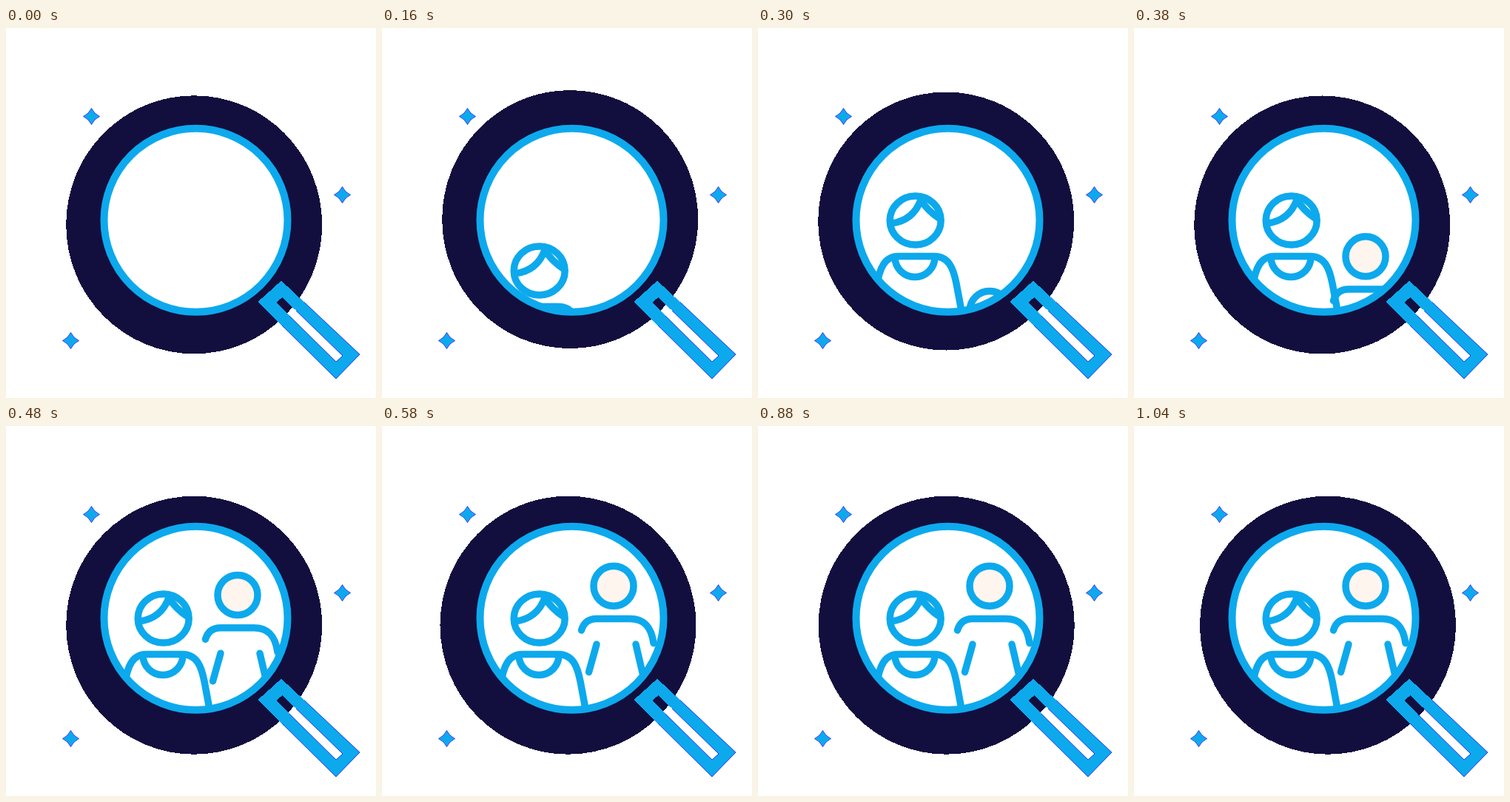
Recreate the animation shown at these times as an HTML page. Size 500x500 px, loop 1580 ms.

```html
<!DOCTYPE html>
<html lang="en">
<head>
<meta charset="utf-8">
<title>People search</title>
<style>
  html, body { margin: 0; width: 100%; height: 100%; overflow: hidden; background: #fff; }
  svg { display: block; width: 100%; height: 100%; }
  .line { fill: none; stroke: #0da9ed; stroke-width: 9.5; stroke-linecap: round; stroke-linejoin: round; }
  .crisp { shape-rendering: crispEdges; }
  .edge { fill: none; stroke: #1a26f4; stroke-width: .9; }
</style>
</head>
<body>
<svg viewBox="0 0 500 500">
  <defs>
    <clipPath id="lens"><circle cx="256.5" cy="259.8" r="124"/></clipPath>
    <path id="star" d="M0-11Q3.5-3.5 11 0Q3.5 3.5 0 11Q-3.5 3.5-11 0Q-3.5-3.5 0-11Z"
          fill="#0da9ed" stroke="#1a26f4" stroke-width=".9"/>
  </defs>

  <ellipse id="disc" class="crisp" rx="173" ry="174.5" fill="#120f3f"/>
  <circle cx="256.5" cy="259.8" r="124" fill="#fff"/>

  <g clip-path="url(#lens)">
    <g id="woman" class="line">
      <ellipse cx="212.7" cy="260" rx="34.5" ry="33"/>
      <path d="M180 264Q210 260 220 232Q229 247 246 258"/>
      <path d="M160 352C164 322 172 308.5 190 308.5H238C258 308.5 264 325 268 345L275.5 385"/>
      <path d="M185 309.5A27 27 0 0 0 239 309.5"/>
    </g>
    <g id="man" class="line">
      <circle cx="313" cy="216.3" r="27" fill="#fff5ef"/>
      <path d="M269.5 276Q274 260.5 290 260.5H335C355 260.5 364 272 367 293.5"/>
      <path d="M290 295L279.5 332.5M343 295L354 342"/>
    </g>
  </g>

  <circle class="line" cx="256.5" cy="259.8" r="124" style="stroke-width:10"/>

  <path class="crisp" fill="#0da9ed" fill-rule="evenodd"
        d="M372 341.5L478 441L446 474L340.5 370ZM373.5 364L455 443L446 451L365 371Z"/>
  <path class="edge" d="M403 370.5L478 441L446 474L373 402M392 382L455 443L446 451L383 389"/>

  <use href="#star" x="115.5" y="119.5"/>
  <use href="#star" x="454.5" y="225.5"/>
  <use href="#star" x="87.5" y="422.5"/>
</svg>
<script>
  const LOOP = 1580, STEP = 20;
  const [disc, woman, man] = ['disc', 'woman', 'man'].map(id => document.getElementById(id));

  // Sine ease-in-out from 0 to 1 between two times.
  function ease(t, start, end) {
    const p = Math.min(1, Math.max(0, (t - start) / (end - start)));
    return (1 - Math.cos(Math.PI * p)) / 2;
  }

  const drop = (el, y) => el.setAttribute('transform', `translate(0 ${y.toFixed(2)})`);

  function draw(t) {
    const x = 254.2 - 7.1 * ease(t, 480, 715) + 14.9 * ease(t, 715, 1040);
    const y = 265.8 - 8 * ease(t, 0, 200) + 11.4 * ease(t, 200, 480);
    disc.setAttribute('cx', x.toFixed(2));
    disc.setAttribute('cy', y.toFixed(2));
    drop(woman, 167.5 * (1 - ease(t, -25, 305)));
    drop(man, 200 * (1 - ease(t, 215, 530)));
  }

  const begin = performance.now();
  function tick() {
    const t = (performance.now() - begin) % LOOP;
    draw(Math.floor(t / STEP) * STEP);
    requestAnimationFrame(tick);
  }
  tick();
</script>
</body>
</html>
```
